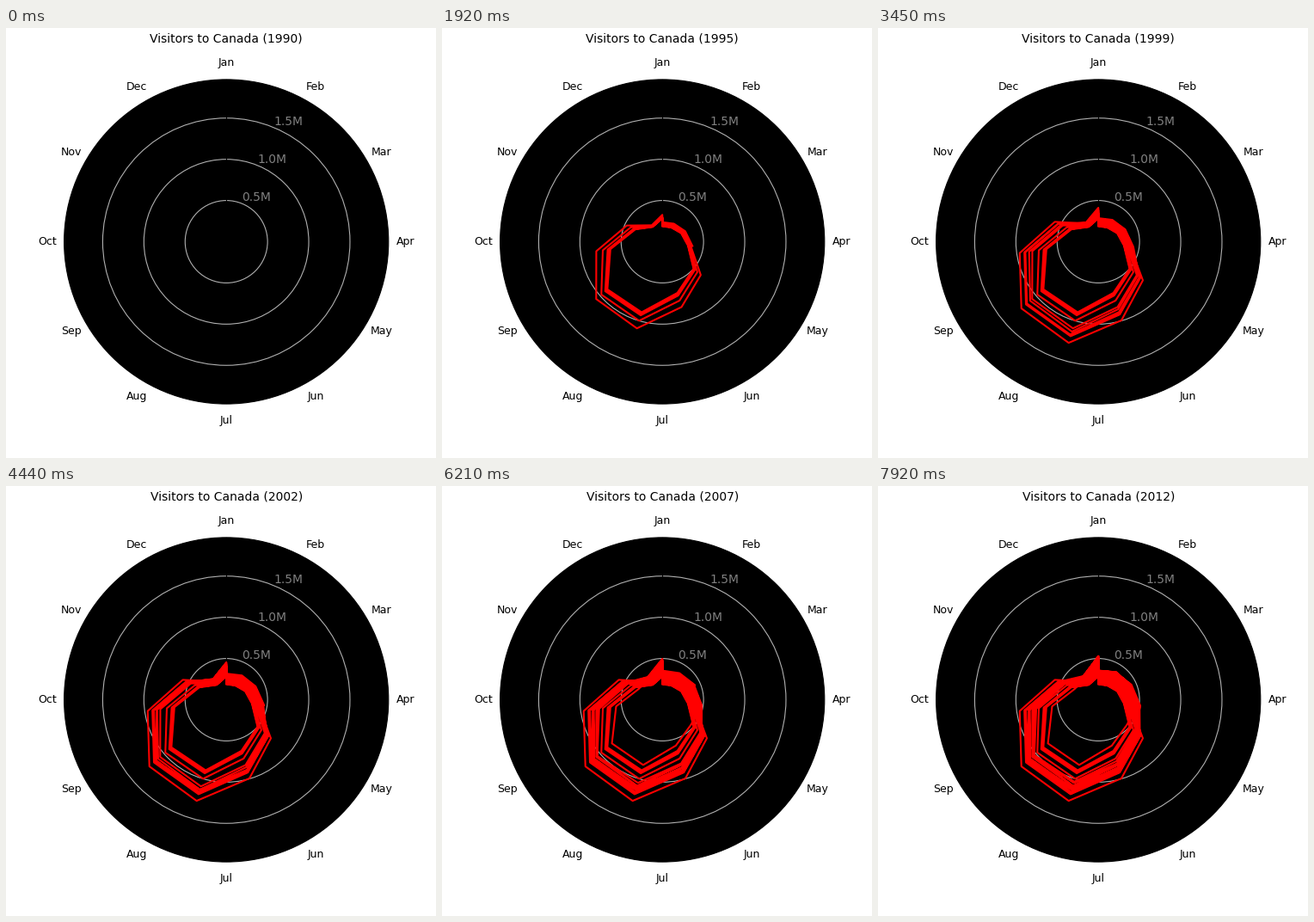
A matplotlib script that plays this animation: 500 px wide and 500 px high, repeating every 8 s.

```python
import numpy as np
import matplotlib.pyplot as plt
from matplotlib.animation import FuncAnimation
from matplotlib.patches import Circle

SIZE, DPI = 500, 100
CX, CY, RADIUS = 256.2, 248.5, 188.6
HALF_MILLION = 47.92          # pixels per 0.5M on the radial axis
LABEL_R = RADIUS + 14 * DPI / 72
LOOP, INTERVAL, MONTH_MS = 8000, 20, 30
FIRST_YEAR, YEARS = 1990, 22
MONTHS = "Jan Feb Mar Apr May Jun Jul Aug Sep Oct Nov Dec".split()

# seasonal curve in pixels for a quiet and for a busy year
QUIET = np.array([18, 19.5, 24, 30, 48, 62, 85.5, 84.5, 61, 34.5, 20.5, 27])
BUSY = np.array([34, 37.5, 41.5, 48.5, 69, 95, 122.5, 118, 93, 55.5, 32, 50])
# how busy the summers are, and the slow growth of the cold months
SUMMER = {1990: 0, 1992: 0.1, 1993: 0.28, 1996: 1, 1998: 0.62, 2000: 0.75,
          2002: 0.6, 2003: -0.2, 2004: 0.45, 2008: 0.72, 2009: 0.4, 2011: 0.5}
GROWTH = {1990: 0, 1993: 0.08, 1996: 0.4, 2000: 0.67, 2008: 1}


def polar(angle, r):
    """Clockwise angle from the top, as stage pixels."""
    return CX + r * np.sin(angle), CY - r * np.cos(angle)


def monthly_path():
    years = np.arange(FIRST_YEAR, FIRST_YEAR + YEARS)
    summer, growth = (np.interp(years, list(d), list(d.values()))[:, None]
                      for d in (SUMMER, GROWTH))
    month = np.arange(12)
    warm = (month >= 4) & (month <= 9)
    r = QUIET + (BUSY - QUIET) * np.where(warm, summer, growth)
    noise = np.random.default_rng(4).uniform(-1, 1, r.shape)
    r *= 1 + 0.02 * growth * noise
    angles = np.linspace(0, 2 * np.pi, 12)
    return polar(np.tile(angles, YEARS), r.ravel())


fig = plt.figure(figsize=(SIZE / DPI, SIZE / DPI), dpi=DPI, facecolor="white")
ax = fig.add_axes([0, 0, 1, 1])
ax.set_xlim(0, SIZE)
ax.set_ylim(SIZE, 0)
ax.axis("off")

ax.add_patch(Circle((CX, CY), RADIUS, fc="black", ec="black", lw=0.8))
for i in (1, 2, 3):
    r = i * HALF_MILLION
    ax.add_patch(Circle((CX, CY), r, fill=False, ec="#b0b0b0", lw=0.8))
    ax.text(*polar(np.radians(22.5), r), f"{i / 2:.1f}M", color="gray",
            size=10, ha="left", va="bottom")
for i, name in enumerate(MONTHS):
    ax.text(*polar(i * np.pi / 6, LABEL_R), name, size=9,
            ha="center", va="center")

ax.plot([CX, CX], [CY, CY - RADIUS], color="black", lw=0.8)
title = ax.text(CX, 17, "", size=10, ha="center", va="baseline")
line, = ax.plot([], [], color="red", lw=1.5)
xs, ys = monthly_path()


def draw(k):
    n = (k * INTERVAL + INTERVAL // 2) // MONTH_MS
    title.set_text(f"Visitors to Canada ({FIRST_YEAR + n // 12})")
    line.set_data(xs[:n], ys[:n])
    return line, title


anim = FuncAnimation(fig, draw, frames=LOOP // INTERVAL, interval=INTERVAL,
                     repeat=True, repeat_delay=0)
plt.show()
```
